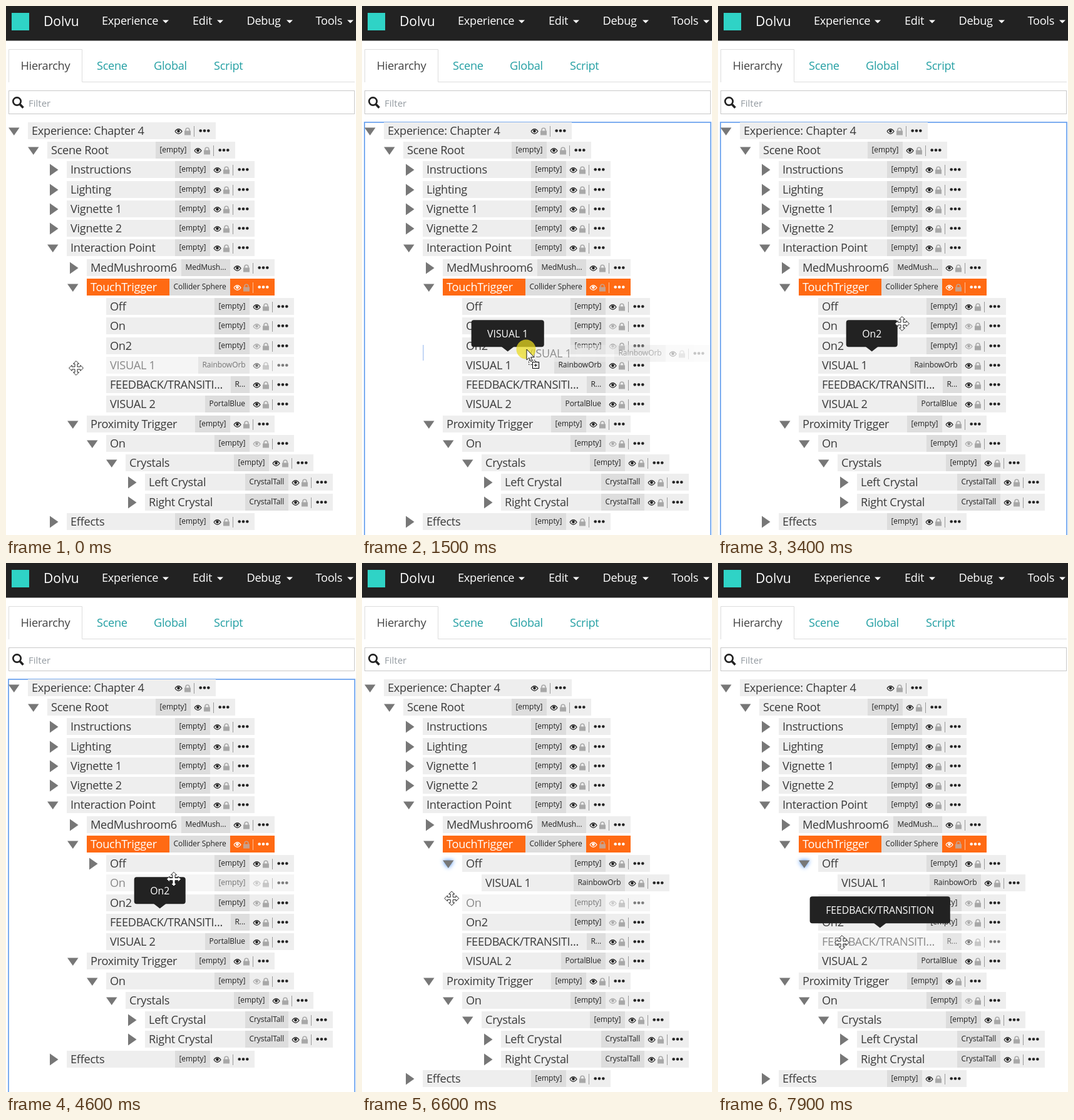
These frames come from a looping animation (559x846 px, 8000 ms). An HTML page with a canvas:

```html
<!DOCTYPE html>
<html lang="en">
<head>
<meta charset="utf-8">
<title>Hierarchy drag and drop</title>
<style>
html, body { margin: 0; width: 100%; height: 100%; overflow: hidden; background: #fff; }
canvas { display: block; }
</style>
</head>
<body>
<canvas id="stage" width="559" height="846"></canvas>
<script>
const LOOP = 8000, STEP = 100;
const FAMILY = '"Open Sans", "Noto Sans", sans-serif';
const screen2d = document.getElementById('stage').getContext('2d');
let g = screen2d;

// depth, label, tag, arrow ('v' open, '>' closed), hidden = grey eye
const row = (depth, label, tag = '[empty]', arrow = '', hidden = false) =>
  ({ depth, label, tag, arrow, hidden });

const HEAD = [
  row(0, 'Experience: Chapter 4', '', 'v'),
  row(1, 'Scene Root', undefined, 'v'),
  ...['Instructions', 'Lighting', 'Vignette 1', 'Vignette 2'].map(s => row(2, s, undefined, '>')),
  row(2, 'Interaction Point', undefined, 'v'),
  row(3, 'MedMushroom6', 'MedMush...', '>'),
  { ...row(3, 'TouchTrigger', 'Collider Sphere', 'v'), selected: true }
];
const OFF = row(4, 'Off'), ON = row(4, 'On', undefined, '', true), ON2 = row(4, 'On2', undefined, '', true);
const VISUAL1 = row(4, 'VISUAL 1', 'RainbowOrb');
const FEEDBACK = row(4, 'FEEDBACK/TRANSITI...', 'R...');
const VISUAL2 = row(4, 'VISUAL 2', 'PortalBlue');
const SLOT = { slot: true };
const TAIL = [
  row(3, 'Proximity Trigger', undefined, 'v'),
  row(4, 'On', undefined, 'v', true),
  row(5, 'Crystals', undefined, 'v'),
  row(6, 'Left Crystal', 'CrystalTall', '>'),
  row(6, 'Right Crystal', 'CrystalTall', '>'),
  row(2, 'Effects', undefined, '>')
];

// time, x, y
const PATH = [
  [0, 112, 579], [900, 166, 569], [1300, 166, 569], [1500, 262, 549], [2100, 262, 503],
  [2300, 262, 503], [2600, 278, 491], [2900, 294, 508], [4500, 294, 508], [5100, 138, 494],
  [6300, 138, 494], [7100, 152, 607], [7300, 152, 607], [7400, 158, 607], [7900, 198, 607]
];

const PITCH = 31.25;
const rowX = depth => Math.round(34.9 + PITCH * depth);
const rowY = i => Math.round(185.9 + PITCH * i);

function pointer(t) {
  const k = PATH.findIndex(p => p[0] >= t);
  if (k <= 0) return PATH[0].slice(1);
  const [t0, x0, y0] = PATH[k - 1], [t1, x1, y1] = PATH[k];
  const u = (t - t0) / (t1 - t0);
  return [x0 + (x1 - x0) * u, y0 + (y1 - y0) * u];
}

function box(x, y, w, h, color) {
  g.fillStyle = color;
  g.fillRect(x, y, w, h);
}

function setFont(size, spacing) {
  g.font = `${size}px ${FAMILY}`;
  g.letterSpacing = spacing + 'px';
}

function text(str, x, y, color, size = 18.2, spacing = -0.3) {
  setFont(size, spacing);
  g.fillStyle = color;
  g.fillText(str, x, y);
}

function poly(points, fill, stroke) {
  g.beginPath();
  points.forEach(p => g.lineTo(p[0], p[1]));
  g.closePath();
  if (fill) { g.fillStyle = fill; g.fill(); }
  if (stroke) { g.strokeStyle = stroke; g.lineWidth = 1; g.stroke(); }
}

function disc(x, y, r, color) {
  g.fillStyle = color;
  g.beginPath();
  g.arc(x, y, r, 0, 7);
  g.fill();
}

function eye(x, y, color) {
  g.strokeStyle = color;
  g.lineWidth = 1.2;
  g.beginPath();
  g.moveTo(x - 5.6, y);
  g.quadraticCurveTo(x, y - 7.6, x + 5.6, y);
  g.quadraticCurveTo(x, y + 7.6, x - 5.6, y);
  g.stroke();
  disc(x, y - 0.4, 2.3, color);
}

function lock(x, y, color) {
  box(x - 5, y - 1, 10, 7, color);
  g.strokeStyle = color;
  g.lineWidth = 1.6;
  g.beginPath();
  g.moveTo(x - 3, y);
  g.lineTo(x - 3, y - 2);
  g.arc(x, y - 2.3, 3, Math.PI, 0);
  g.lineTo(x + 3, y);
  g.stroke();
}

function arrow(kind, x, y, color, glow) {
  g.save();
  if (glow) { g.shadowColor = '#3d8bff'; g.shadowBlur = 7; }
  poly(kind === 'v'
    ? [[x - 31, y + 8.5], [x - 13.5, y + 8.5], [x - 22.2, y + 21]]
    : [[x - 27, y + 4.5], [x - 13.5, y + 14], [x - 27, y + 23.5]], color);
  g.restore();
}

function tagLeft(r, x) {
  setFont(12, -0.08);
  return Math.round(x + 228.8 - g.measureText(r.tag).width - 13);
}

function drawRow(r, x, y) {
  const on = r.selected;
  box(x, y, 300, 27, on ? '#ff6a13' : '#eee');
  text(r.label, x + 6, y + 20, on ? '#fff' : '#3a3a3a');
  if (r.tag) {
    const left = tagLeft(r, x);
    box(left, y, x + 229 - left, 27, '#ddd');
    text(r.tag, left + 6.5, y + 17, '#222', 12, -0.08);
  }
  const ink = on ? '#fff' : '#222';
  eye(x + 240.5, y + 14.5, r.hidden ? '#aaa' : ink);
  lock(x + 255, y + 14.5, on ? '#c9a08a' : '#a8a8a8');
  box(x + 265, y + 6, 1, 17, on ? '#ffc09a' : '#999');
  for (const d of [-6.3, 0, 6.3]) disc(x + 282 + d, y + 13.5, 2.3, ink);
}

function drawSlot(y) {
  box(160, y, 397, 28, '#add8e6');
  g.strokeStyle = '#000';
  g.lineWidth = 3;
  g.setLineDash([3, 3]);
  g.strokeRect(161.5, y + 1.5, 394, 25);
  g.setLineDash([]);
}

function makeGhost() {
  const c = document.createElement('canvas');
  c.width = 470;
  c.height = 27;
  g = c.getContext('2d');
  box(0, 0, 1.5, 25, '#3d7be0');
  drawRow(VISUAL1, 159, 0);
  const fade = g.createRadialGradient(165, 7, 0, 165, 7, 320);
  fade.addColorStop(0, 'rgba(0,0,0,.6)');
  fade.addColorStop(1, 'rgba(0,0,0,.2)');
  g.globalCompositeOperation = 'destination-in';
  box(0, 0, 470, 27, fade);
  g = screen2d;
  return c;
}

function tooltip(label, r, index, alpha) {
  const x = rowX(r.depth), y = rowY(index);
  const mid = (x + tagLeft(r, x)) / 2 - 0.8;
  setFont(15.8, 0);
  const w = g.measureText(label).width;
  g.globalAlpha = alpha;
  g.fillStyle = '#222';
  g.beginPath();
  g.roundRect(mid - w / 2 - 25.5, y - 58.7, w + 51, 43, 4);
  g.fill();
  poly([[mid - 10, y - 16.2], [mid + 10, y - 16.2], [mid, y - 8.5]], '#222');
  text(label, mid - w / 2, y - 31.5, '#fff', 15.8, 0);
  g.globalAlpha = 1;
}

function moveCursor(x, y) {
  const arm = [[-2, -2], [-2, -6.8], [-4.6, -6.8], [0, -11.4], [4.6, -6.8], [2, -6.8]];
  const points = [];
  for (let k = 0; k < 4; k++) {
    const c = Math.round(Math.cos(k * Math.PI / 2)), s = Math.round(Math.sin(k * Math.PI / 2));
    arm.forEach(([a, b]) => points.push([x + a * c - b * s, y + a * s + b * c]));
  }
  poly(points, '#fff', '#222');
}

function dragCursor(x, y) {
  disc(x, y, 15.5, 'rgba(236,220,30,.72)');
  g.save();
  g.translate(x + 1, y);
  g.lineWidth = 1;
  g.strokeStyle = '#fff';
  g.strokeRect(3.5, 17.5, 11, 7);
  g.setLineDash([2, 2]);
  g.strokeStyle = '#000';
  g.strokeRect(3.5, 17.5, 11, 7);
  g.setLineDash([]);
  poly([[0, 0], [0, 17], [4, 13.5], [6.5, 19.5], [9, 18.5], [6.6, 12.6], [11.8, 12.6]], '#fff', '#111');
  box(9, 20, 11, 11, '#fff');
  g.strokeStyle = '#000';
  g.strokeRect(9.5, 20.5, 10, 10);
  box(12, 25, 5, 1, '#000');
  box(14, 23, 1, 5, '#000');
  g.restore();
}

function handCursor(x, y) {
  g.save();
  g.translate(x - 2, y - 10.5);
  g.beginPath();
  g.moveTo(-2, 14);
  g.lineTo(-2, 2);
  g.quadraticCurveTo(0, -2, 2, 2);
  g.lineTo(2, 8);
  g.quadraticCurveTo(4.5, 6, 5.5, 9);
  g.quadraticCurveTo(8, 7.5, 8.8, 10);
  g.quadraticCurveTo(11.5, 9, 12, 12);
  g.lineTo(12, 16);
  g.lineTo(9.5, 20);
  g.lineTo(9.5, 23.5);
  g.lineTo(0, 23.5);
  g.lineTo(0, 21);
  g.lineTo(-6, 13);
  g.quadraticCurveTo(-5.5, 10, -2, 14);
  g.closePath();
  g.fillStyle = '#fff';
  g.fill();
  g.strokeStyle = '#111';
  g.lineWidth = 1.2;
  g.stroke();
  for (const a of [2, 5.5, 8.8]) {
    g.beginPath();
    g.moveTo(a, 9);
    g.lineTo(a, 13);
    g.stroke();
  }
  g.restore();
}

function drawChrome() {
  box(0, 0, 559, 846, '#fff');
  box(0, 0, 559, 55.5, '#222');
  box(9, 11, 28, 28, '#2fd3c6');
  text('Dolvu', 60, 32, '#fff', 21, 0);
  [['Experience', 153, 250], ['Edit', 298, 337], ['Debug', 384.5, 448], ['Tools', 494.5, 545]]
    .forEach(([label, x, c]) => {
      text(label, x, 30, '#fff');
      poly([[c, 22.5], [c + 10, 22.5], [c + 5, 27.5]], '#fff');
    });

  g.strokeStyle = '#ddd';
  g.lineWidth = 1;
  g.beginPath();
  [[4.5, 122], [4.5, 69.5], [121.5, 69.5], [121.5, 121.5], [557, 121.5]].forEach(p => g.lineTo(...p));
  g.stroke();
  text('Hierarchy', 23.5, 102, '#444');
  [['Scene', 145], ['Global', 236], ['Script', 332]].forEach(([s, x]) => text(s, x, 102, '#239fa3'));

  g.strokeStyle = '#c8c8c8';
  g.strokeRect(4.5, 135.5, 552, 37);
  g.strokeStyle = '#222';
  g.lineWidth = 2.7;
  g.beginPath();
  g.arc(17.5, 152.5, 6.2, 0, 7);
  g.stroke();
  g.lineWidth = 3.6;
  g.beginPath();
  g.moveTo(22.3, 157.3);
  g.lineTo(27.5, 162.8);
  g.stroke();
  text('Filter', 36, 161, '#939aa0', 15, 0);
}

function children(t) {
  const rest = [FEEDBACK, VISUAL2];
  if (t >= 5400) return [{ ...OFF, arrow: 'v' }, { ...VISUAL1, depth: 5 }, ON, ON2, ...rest];
  if (t >= 3800) return [{ ...OFF, arrow: '>' }, ON, ON2, ...rest];
  if (t >= 1800 && t < 3300) return [OFF, SLOT, ON, ON2, ...rest];
  if (t >= 1600 && t < 1800) return [OFF, ON, SLOT, ON2, ...rest];
  return [OFF, ON, ON2, VISUAL1, ...rest];
}

function hovered(t, y) {
  if (t < 1400 || (t >= 1600 && t < 3300)) return 12;
  if ((t >= 4600 && t < 5100) || t >= 6500) return Math.floor((y - 186) / PITCH);
  return -1;
}

const ghost = makeGhost();

function draw(t) {
  const [x, y] = pointer(t);
  const dim = hovered(t, y);
  const dragging = t >= 1400 && t < 3300;
  drawChrome();

  if (t >= 1100 && t < 5300) {
    g.strokeStyle = '#669fee';
    g.lineWidth = 1.7;
    g.strokeRect(4, 186, 553, 700);
  }

  [...HEAD, ...children(t), ...TAIL].forEach((r, i) => {
    const top = rowY(i);
    if (r.slot) return drawSlot(top);
    const left = rowX(r.depth);
    if (r.arrow) {
      const isOff = r.label === 'Off';
      arrow(r.arrow, left, top, isOff && t >= 5100 && t < 6500 ? '#111' : '#777', isOff && t >= 5300);
    }
    g.globalAlpha = i === dim ? 0.58 : 1;
    drawRow(r, left, top);
    g.globalAlpha = 1;
  });

  if (dragging) g.drawImage(ghost, Math.round(x - 165), Math.round(y - 7));

  if (t >= 600 && t < 1600) tooltip('VISUAL 1', VISUAL1, 12, t < 700 ? 0.5 : 1);
  else if (t >= 1600 && t < 4700) tooltip('On2', ON2, 12, 1);
  else if (t >= 7600) tooltip('FEEDBACK/TRANSITION', FEEDBACK, 13, t < 7700 ? 0.5 : 1);

  if (t >= 1100 && t < 3300) dragCursor(x, y);
  else if (t >= 5100 && t < 6500) handCursor(x, y);
  else moveCursor(x, y);
}

const start = performance.now();
function tick() {
  const t = (performance.now() - start) % LOOP;
  draw(Math.floor(t / STEP) * STEP);
  requestAnimationFrame(tick);
}
tick();
</script>
</body>
</html>
```
